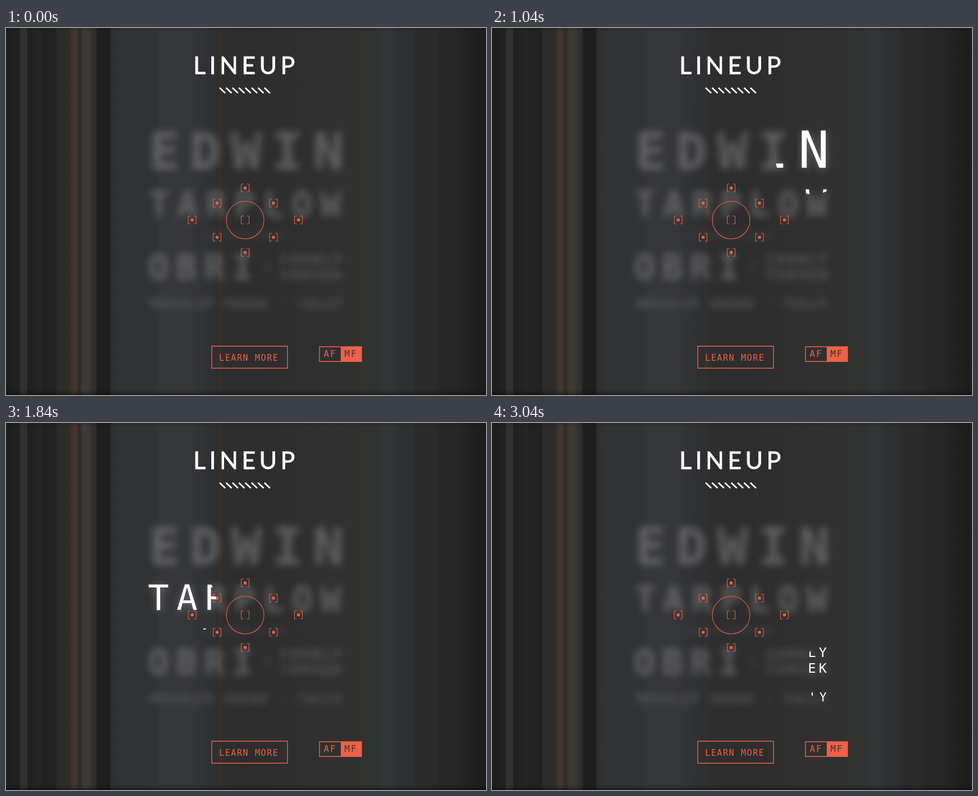
Recreate the animation shown at these times as an HTML page. Size 856 px wide and 654 px high, loop 3.12 s.

```html
<!DOCTYPE html>
<html lang="en">
<head>
<meta charset="utf-8">
<title>Lineup</title>
<style>
html, body { margin: 0; width: 100%; height: 100%; overflow: hidden; background: #1f1f1f; }
svg {
  display: block; width: 856px; height: 654px;
  background:
    linear-gradient(#0002, #0000 8px, #0000 644px, #0003 651px, #0007 653px),
    linear-gradient(90deg,
      #1d1d1d 0, #222 24px, #313232 26px, #303131 37px, #202020 39px, #252525 63px,
      #212121 66px, #222 89px, #2b2b29 91px, #2e2d2a 113px, #43352e 119px, #46372f 125px,
      #302f2d 128px, #302f2d 134px, #3f3934 137px, #3c3835 147px, #323330 153px, #2f302e 160px,
      #1e1e1e 163px, #1f1f1f 185px, #2d2f31 188px, #303234 205px, #313335 268px, #35363a 274px,
      #35363a 330px, #303134 362px, #2e2f30 378px, #382f2c 382px, #2e2e2e 387px, #2d2d2d 440px,
      #2e2e2e 490px, #322e2c 495px, #2e2e2e 500px, #303030 570px, #30312f 625px, #31332f 640px,
      #30322f 662px, #323437 672px, #323437 692px, #2e3032 700px, #2d2f31 726px, #2b2b2c 732px,
      #2b2b2b 768px, #272727 776px, #262626 806px, #202020 830px, #1c1c1c 856px);
}
text { font-family: "DejaVu Sans Mono", monospace; white-space: pre; }
#title { font: 43px Lato, sans-serif; letter-spacing: 6.4px; stroke: #fff; stroke-width: .8px; }
.big { font-size: 91.5px; letter-spacing: 18px; }
.mid { font-size: 62.5px; letter-spacing: 13.4px; }
.side { font-size: 23.5px; letter-spacing: 4.9px; }
.foot { font-size: 21px; letter-spacing: 3.66px; }
#soft { opacity: .23; font-weight: bold; filter: blur(7px); }
</style>
</head>
<body>
<svg viewBox="0 0 856 654" fill="#fff">
  <defs>
    <g id="acts">
      <text class="big" x="254" y="249">EDWIN</text>
      <text class="mid" x="253" y="333">TARPLOW</text>
      <path d="M352 366h150v2h-150z"/>
      <text class="mid" x="252" y="445" style="letter-spacing:12.4px">OBRI</text>
      <path d="M464 411h2v21h-2z"/>
      <text class="side" x="487.4" y="417">CORBLY</text>
      <text class="side" x="487.4" y="445">TARVEK</text>
      <text class="foot" x="258" y="496">MOSSLIP GREBE · TALLY</text>
    </g>
    <clipPath id="lens"><circle id="spot" r="66"/></clipPath>
  </defs>

  <text id="title" x="334" y="82">LINEUP</text>
  <path id="hatch" stroke="#fff" stroke-width="2.6"/>
  <use id="soft" href="#acts" x="1" y="3"/>

  <g fill="none" stroke="#ee6147">
    <circle cx="426.5" cy="342.3" r="33.5" stroke-width="1.1"/>
    <path id="brackets" stroke-width="1"/>
    <path id="dots" fill="#ee6147" stroke="none"/>
    <path d="M367 567h135v39.3h-135zM559 568h75v26.3h-75z" stroke-width="1.4"/>
  </g>
  <g fill="#ee6147">
    <path d="M597 568h37v26h-37z"/>
    <text x="380" y="593" font-size="15" letter-spacing="1.62">LEARN MORE</text>
    <text x="566.5" y="586" font-size="16" letter-spacing="1.8">AF</text>
    <text x="603.5" y="586" font-size="16" letter-spacing="1.8" fill="#3a3634">MF</text>
  </g>

  <g clip-path="url(#lens)"><use href="#acts"/></g>
</svg>
<script>
const $ = id => document.getElementById(id);
const LOOP = 3120, STEP = 80, START = 160, SEG = 240;

// Lens centre every SEG ms from START on
const path = [
  [202, 192], [292, 196], [413, 203], [527, 211], [578, 245], [520, 311], [419, 317],
  [309, 321], [240, 352], [278, 408], [381, 429], [501, 437], [622, 444]
];

const points = [
  [426.5, 285], [376.5, 312], [477, 312], [332, 342], [521.5, 342],
  [376.5, 373], [477, 373], [426.5, 400]
];
const bracket = ([x, y]) =>
  `M${x - 3} ${y - 7}h-4v14h4M${x + 3} ${y - 7}h4v14h-4`;

$('brackets').setAttribute('d', [...points, [426.5, 342]].map(bracket).join(''));
$('dots').setAttribute('d', points.map(([x, y]) => `M${x - 2.5} ${y - 2.5}h5v5h-5z`).join(''));
$('hatch').setAttribute('d',
  Array.from({ length: 8 }, (_, i) => `M${381 + i * 11.4} 106.5l10 9.5`).join(''));

const at = i => path[Math.max(0, Math.min(path.length - 1, i))];

function lensAt(t) {
  const s = (t - START) / SEG, i = Math.floor(s), u = s - i;
  return [0, 1].map(k => {
    const [a, b, c, d] = [-1, 0, 1, 2].map(n => at(i + n)[k]);
    return b + u / 2 * (c - a + u * (2 * a - 5 * b + 4 * c - d + u * (3 * (b - c) + d - a)));
  });
}

function draw(now) {
  const t = Math.floor(now % LOOP / STEP) * STEP;
  const [x, y] = t < START ? [-200, -200] : lensAt(t);
  $('spot').setAttribute('cx', x);
  $('spot').setAttribute('cy', y);
}

let begin;
function tick(now) {
  begin ??= now;
  draw(now - begin);
  requestAnimationFrame(tick);
}
draw(0);
requestAnimationFrame(tick);
</script>
</body>
</html>
```
